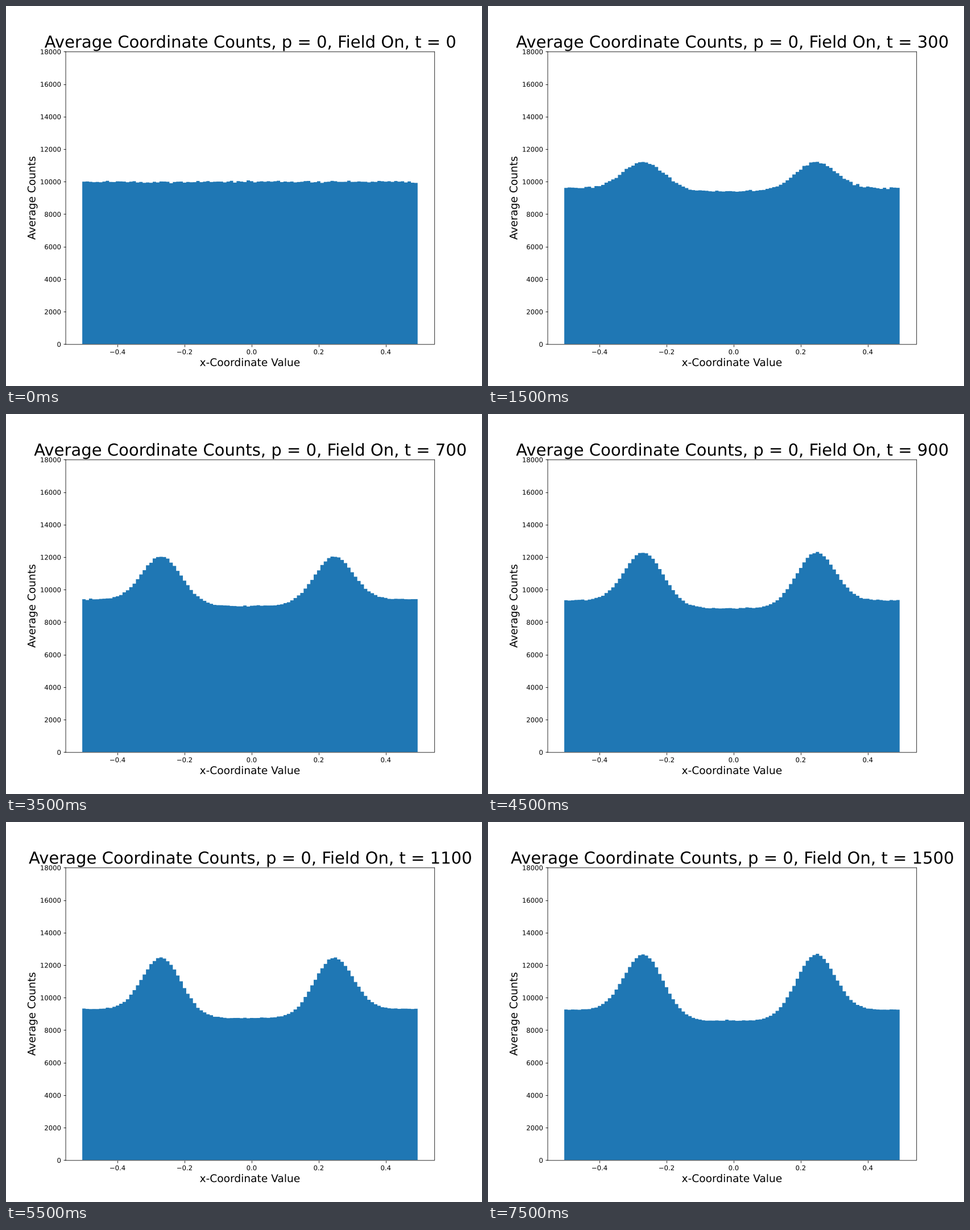
A matplotlib script for the animation above (8000 ms loop, 837 by 669 pixels).

```python
import matplotlib.pyplot as plt
import numpy as np
from matplotlib import patheffects
from matplotlib.animation import FuncAnimation

W, H = 837, 669
DPI = 83.7
FRAMES, INTERVAL = 16, 500
STEP = 100  # simulation time per frame

# Draw text as outlines and skip pixel snapping for soft, subpixel edges.
plt.rcParams.update({
    "font.family": "DejaVu Sans",
    "text.hinting": "none",
    "path.snap": False,
    "path.effects": [patheffects.Normal()],
    "axes.linewidth": 0.72,
    "xtick.major.width": 0.72,
    "ytick.major.width": 0.72,
})

BINS = np.arange(100) / 100 - 0.5
EDGES = np.arange(101) / 100 - 0.505
PEAKS = (-0.27, 0.247)


def rise(t, tau):
    """Saturating growth from 0 towards 1."""
    return 1 - np.exp(-t / tau)


def counts(t):
    peak = 10000 + 2850 * rise(t, 550)
    inner = 10000 - 130 * rise(t, 60) - 1550 * rise(t, 850)
    outer = 10000 - 105 * rise(t, 60) - 700 * rise(t, 600)
    spread = 0.025 * np.exp(-t / 140)

    # Each peak falls to its own floor on the inner and outer side.
    center = np.where(BINS < sum(PEAKS) / 2, *PEAKS)
    inside = (BINS > PEAKS[0]) & (BINS < PEAKS[1])
    floor = np.where(inside, inner, outer)
    sigma = np.where(inside, 0.0597, 0.056) + spread
    bell = np.exp(-0.5 * ((BINS - center) / sigma) ** 2)

    noise = np.random.default_rng(t + 7).normal(size=BINS.size)
    return floor + (peak - floor) * bell + noise * (16 + 22 * np.exp(-t / 400))


# The small margin keeps the pixel size from rounding down.
fig, ax = plt.subplots(figsize=((W + 1e-6) / DPI, (H + 1e-6) / DPI), dpi=DPI)
hist = ax.stairs(counts(0), EDGES, fill=True, color="#1f77b4", linewidth=0)

# Frame lines sit slightly right of and below the axes box.
for side, shift in zip(("left", "right", "top", "bottom"), (-1, 1, -1, 1)):
    ax.spines[side].set_position(("outward", 0.36 * shift))

ax.set_xlim(-0.555, 0.545)
ax.set_ylim(0, 18000)
ax.set_xticks([-0.4, -0.2, 0, 0.2, 0.4])
ax.set_yticks(range(0, 18001, 2000))
ax.set_xlabel("x-Coordinate Value", fontsize=16)
ax.set_ylabel("Average Counts", fontsize=16)
title = ax.set_title("", fontsize=25)


def draw(i):
    t = i * STEP
    hist.set_data(counts(t))
    title.set_text(f"Average Coordinate Counts, p = 0, Field On, t = {t}")
    return hist, title


anim = FuncAnimation(fig, draw, frames=FRAMES, init_func=lambda: draw(0),
                     interval=INTERVAL, repeat=True, repeat_delay=0)
plt.show()
```
